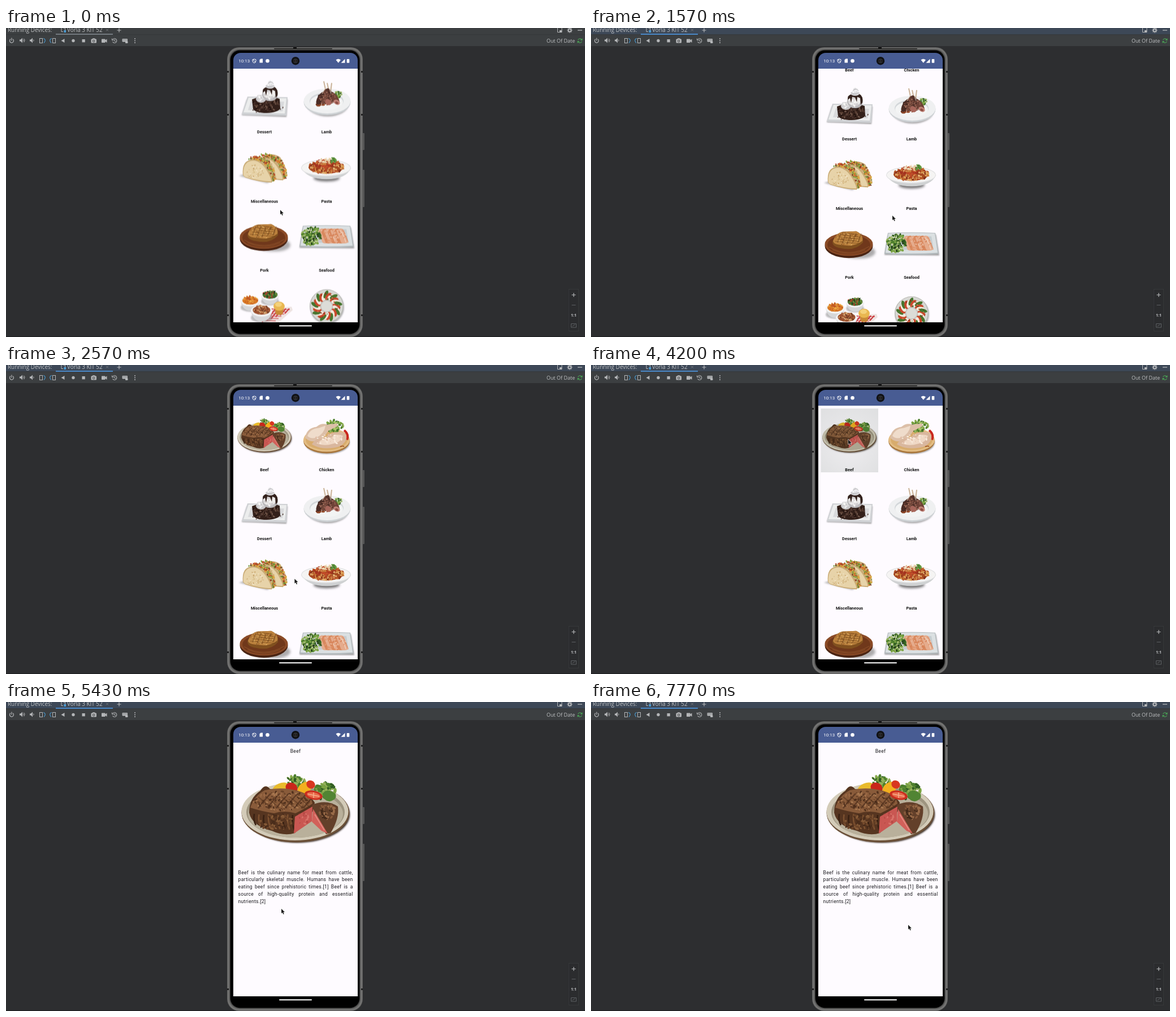
An HTML page with a canvas for the animation above (8 s loop, 1024 by 547 pixels).

```html
<!DOCTYPE html>
<html lang="en">
<head>
<meta charset="utf-8">
<title>Recipe app demo</title>
<style>
html, body { margin: 0; width: 100%; height: 100%; overflow: hidden; background: #2d2e30; }
canvas { display: block; width: 100%; height: 100%; }
</style>
</head>
<body>
<canvas id="stage" width="1024" height="547"></canvas>
<script>
const LOOP = 8000, PITCH = 122.4, PAPER = '#fefbff', ICON = '#b4b6b8';
const stage = document.getElementById('stage').getContext('2d');
let g = stage, seed = 1;

const rnd = () => (seed = seed * 16807 % 2147483647) / 2147483647;
const fill = (c, d) => { g.fillStyle = c; g.fill(new Path2D(d)); };
const line = (c, w, d) => { g.strokeStyle = c; g.lineWidth = w; g.stroke(new Path2D(d)); };
const oval = (c, x, y, rx, ry = rx, rot = 0) => {
  g.fillStyle = c;
  g.beginPath();
  g.ellipse(x, y, rx, ry, rot, 0, 7);
  g.fill();
};
const ring = (c, w, x, y, r, from = 0, to = 7) => {
  g.strokeStyle = c;
  g.lineWidth = w;
  g.beginPath();
  g.arc(x, y, r, from, to);
  g.stroke();
};
const box = (c, x, y, w, h, r = 0) => {
  g.fillStyle = c;
  g.beginPath();
  g.roundRect(x, y, w, h, r);
  g.fill();
};
const text = (s, x, y, font, c, align = 'left') => {
  g.font = font;
  g.fillStyle = c;
  g.textAlign = align;
  g.fillText(s, x, y);
};
// Scatter small ovals inside an ellipse.
const bits = (colors, n, x, y, rx, ry, size) => {
  for (let i = 0; i < n; i++) {
    const a = rnd() * 6.283, r = Math.sqrt(rnd()), s = size * (0.6 + 0.6 * rnd());
    oval(colors[i % colors.length], x + rx * r * Math.cos(a), y + ry * r * Math.sin(a), s, s * 0.55, rnd() * 3);
  }
};
const soft = (c, blur, draw) => {
  g.save();
  g.filter = `blur(${blur}px)`;
  draw(c);
  g.restore();
};

const GREENS = ['#4d7f2d', '#7ba343', '#2f5a22', '#93b05a'];

// Drawn at full size; the grid shows it at half scale.
function beef() {
  soft('#2a1d15', 1.5, c => oval(c, 3, 9, 93, 50));
  oval('#6b5038', 0, 6, 95.5, 52.5);
  oval('#d3cbb8', -1, 4, 94.5, 51);
  oval('#9d947f', 0, 5, 87, 45);
  oval('#b9b09b', 0, 8, 84, 42);
  bits(GREENS, 45, 0, -49, 17, 9, 4);
  bits(GREENS, 70, 53, -33, 18, 14, 4.5);
  oval('#e9bb2c', -27, -39, 14, 7, -.4);
  oval('#c9261b', -7, -38, 11, 9, .5);
  oval('#f3b01f', 16, -37, 14, 10, -.7);
  oval('#d83720', 27, -44, 8, 7, .6);
  fill('#518433', 'M48-28Q58-39 71-27Q74-17 60-14Q48-16 48-28Z');
  fill('#563520', 'M-82 6Q-82-20-62-33Q-54-47-45-36L0-34Q24-28 34-12L32 2L-1 42Q-20 48-42 38Q-77 29-82 6Z');
  fill('#895b3a', 'M-80-3Q-72-25-54-34Q-22-41 6-32Q28-26 30-10Q18-2 0 7Q-20 1-38 7Q-62 3-80-3Z');
  bits(['#a87850', '#6b4429', '#976643', '#4f301d'], 150, -25, -15, 50, 17, 2.6);
  for (let i = 0; i < 6; i++) {
    line('#42271899', 2.5, `M${-66 + i * 16}-2q7-10 22-26`);
    line('#4a2c1a77', 2, `M${-66 + i * 14}-22q12 9 23 20`);
  }
  for (let i = 0; i < 9; i++) line(i % 2 ? '#7d5130' : '#382012', 2.5, `M${-73 + i * 8.5} ${8 + i % 3}q-2 12 3 ${20 + i}`);
  bits(['#6d4529', '#4a2d1b', '#855a37'], 60, -36, 22, 33, 13, 3);
  fill('#c95752', 'M-1 13L30-5L29 21L-3 43Z');
  bits(['#d9736a', '#b84a46'], 18, 14, 18, 11, 12, 2.5);
  fill('#63402a', 'M29-8Q55-19 75-5Q78 16 62 42L54 44L32 2Z');
  bits(['#85583a', '#432a1a', '#9a6c49'], 45, 57, 4, 15, 13, 3);
  fill('#d2605a', 'M31-1L57 43L46 38L29 22Z');
  line('#e59286', 1.5, 'M34 9L51 37');
  oval('#c92d1e', 32, -25, 16, 8, .2);
  oval('#e8694b', 32, -25, 12, 5, .2);
  line('#f6b08d', 1.5, 'M22-27L42-23M32-30V-20');
}

function chicken() {
  soft('#6669', 1.2, c => oval(c, 1, 11, 40, 20));
  oval('#a9773d', 0, 8, 41, 22);
  oval('#e3bd84', 0, 6, 41, 21);
  oval('#d8ac6d', 0, 6, 37, 18);
  bits(GREENS, 60, 14, -18, 16, 10, 3.2);
  bits(['#a9c968'], 14, 14, -19, 13, 8, 2);
  line('#c9281f', 4, 'M31-11Q40-4 36 6');
  fill('#dcbfa8', 'M-38 2Q-35-15-18-17Q-9-25 1-21L18-23Q22-20 17-17L3-10Q-4 2-15 7Q-30 12-38 2Z');
  fill('#efdccb', 'M-34-1Q-29-14-14-15L-2-19Q-4-5-18 2Q-28 5-34-1Z');
  fill('#d9b79e', 'M-26 14Q-20 2-3 2Q10-9 22-8Q36-8 35 4Q30 18 13 20Q-7 23-20 17Z');
  fill('#efd8c5', 'M-18 12Q-5 2 8 2Q19-6 29-1Q25 11 11 13Q-5 18-18 12Z');
  bits(['#fbeee0', '#e0bba3', '#f5e3d3'], 34, 4, 5, 24, 9, 2);
  line('#9b4f23', 1.5, 'M24 18q5-2 7 0');
}

function dessert() {
  soft('#777a', 1, c => fill(c, 'M-31 1L41 1L39 32L-40 29Z'));
  fill('#cfd1d4', 'M-30-4L41-3L39 30L-40 28Z');
  fill('#eceded', 'M-28-2L39-1L36 26L-37 24Z');
  fill('#d9dadc', 'M-24 4L35 5L32 22L-29 20Z');
  bits(['#3b211a'], 28, 2, 17, 33, 8, 1.3);
  fill('#33201a', 'M-22 1Q2-9 27 0L28 17Q24 24 4 25Q-16 25-20 18Z');
  bits(['#5b4034', '#21120e', '#47302a', '#70564a'], 110, 3, 10, 24, 12, 2);
  oval('#c9c8ca', -6, 0, 9, 7);
  bits(['#f5f4f3', '#dedddf'], 22, -7, -2, 7, 5, 2.5);
  oval('#bcbabc', 10, -8, 14, 12);
  oval('#e9e7e6', 9, -9, 11, 9);
  bits(['#f7f5f3', '#cfccce'], 24, 9, -8, 10, 8, 2.5);
  fill('#33211c', 'M-3-11Q-4-19 4-21L18-21Q25-17 23-6L20-2L19-14L14-16L13-7L10-15L5-16L3-5L1-14Z');
  oval('#cfced1', 10, -22, 8, 4);
  bits(['#f2f2f3', '#dcdbde'], 22, 11, -26, 5, 5, 2.5);
  line('#a9a8ac', .8, 'M5-22q8 2 12-2M6-27q7-6 10 1');
}

function lamb() {
  soft('#777a', 1.5, c => oval(c, 2, 11, 36, 20));
  oval('#cdd1d4', 1, 6, 41.5, 23);
  oval('#eff0f1', 1, 4, 41.5, 22);
  oval('#d3d7da', 0, 4, 30, 15);
  oval('#f3f4f4', 0, 6, 29, 14);
  bits(['#8a4223', '#a8572f', '#6d3019'], 30, -9, 9, 13, 4, 2.2);
  bits(GREENS, 34, 21, -8, 6, 6, 2.2);
  line('#c9b196', 2, 'M-1-12L-5-31M4-14L1-28M7-12L9-28');
  oval('#4a2c25', -10, -1, 6, 13, .55);
  oval('#6d4438', -3, -4, 6, 14, .25);
  oval('#55332b', 5, -5, 6, 14, -.25);
  oval('#6f4237', 14, -1, 6, 13, -.6);
  bits(['#8d5d4e', '#3c241f', '#79493c', '#a2705f'], 65, 1, -2, 16, 11, 1.8);
  oval('#a7665b', 3, 6, 6, 5, .6);
  oval('#c28378', 18, 6, 6, 4, .5);
  oval('#8b4c42', 18, 7, 3, 2, .5);
  line('#e2d5c4', 1, 'M-8-9l6-10M8-9l-3-9');
}

function taco(x, y) {
  const stuffing = ['#6f8f35', '#b5492a', '#d9a93f', '#8fa845', '#74442b', '#d9762f'];
  g.save();
  g.translate(x, y);
  fill('#cdb07d', 'M-27-13Q-8-26 8-15Q19 2 21 18L13 25Z');
  // Filling follows the open edge of the shell.
  for (let i = 0; i <= 12; i++) {
    const k = i / 12, q = 1 - k;
    bits(stuffing, 9, -23 * q * q + 22 * q * k + 16 * k * k, -16 * q * q - 44 * q * k + 21 * k * k, 5, 4, 2.2);
  }
  fill('#c9ab75', 'M-38 13Q-41-14-20-15Q-4-14 7 5Q16 20 13 26Q-11 25-34 17Z');
  fill('#e7d3a9', 'M-37 13Q-39-12-20-13Q-5-12 5 6Q13 20 12 24Q-11 23-34 16Z');
  bits(['#d6bd88', '#f1e4c6', '#cba973'], 50, -17, 6, 16, 12, 1.4);
  g.restore();
}

function tacos() {
  soft('#8889', 1.5, c => fill(c, 'M-45 14L-30 9L12 23L5 27Z'));
  taco(20, -4);
  taco(0, 0);
}

function pasta() {
  soft('#444b', 2, c => oval(c, 0, 18, 23, 6));
  fill('#cfd1d2', 'M-44 0Q-35 20 0 20Q35 20 43 0Z');
  oval('#dedfe0', -1, 0, 44, 15);
  oval('#f5f4f3', -1, 0, 43, 13.5);
  oval('#a5491f', -1, -1, 31, 11);
  bits(['#c87a38', '#a93f1f', '#dba05a', '#b9562a', '#85301a', '#e5b373'], 200, 0, -2, 31, 11, 2.8);
  bits(['#a63320', '#c34c28'], 40, -3, -7, 19, 8, 2.6);
  bits(['#f6e7cd', '#e4c99f'], 50, -1, -13, 14, 4, 1.7);
  bits(['#4a8031', '#6a9c44'], 14, 12, -14, 5, 4, 2.5);
}

function pork() {
  soft('#7779', 2, c => oval(c, 9, 11, 37, 14, .1));
  oval('#4a2413', -1, 3, 42.5, 21.5);
  oval('#8a4a26', -1, 0, 42.5, 20.5);
  oval('#70381b', -1, 1, 38, 17.5);
  line('#96592f', .8, 'M-36 5Q0 25 35 4M-30 10Q0 24 28 10');
  fill('#80501f', 'M-30-4Q-24-20-12-22L12-23Q26-17 24-3Q10 13-15 7Q-30 5-30-4Z');
  fill('#bb813d', 'M-29-6Q-23-20-12-22L12-23Q25-17 23-6Q8 6-14 1Q-28 1-29-6Z');
  bits(['#d3a057', '#a66b30', '#c48d48', '#93602c'], 90, -3, -9, 22, 11, 2);
  for (let i = 0; i < 5; i++) {
    line('#6b4019aa', 1.2, `M${-21 + i * 9}-3l6-16`);
    line('#744719aa', 1, `M${-25 + i * 3} ${-5 - i * 4}l${44 - i * 4} 4`);
  }
}

function seafood() {
  soft('#777a', 1, c => fill(c, 'M-42-16L43-17L49 20L-48 19Z'));
  fill('#b3babd', 'M-42-20Q0-22 42-20L48 17Q0 21-48 17Z');
  fill('#dbe0e2', 'M-41-19Q0-21 41-19L46 15Q0 18-46 15Z');
  fill('#c6cdd0', 'M-36-14L35-14L39 10L-39 10Z');
  for (let i = 0; i < 7; i++) {
    const x = -12 + i * 5.5;
    fill(i % 2 ? '#d9895f' : '#e5ab8c', `M${x}-14q6-3 10 2l8 21q-7 4-13 1l-8-19Z`);
    line('#f1d2bd', 1.3, `M${x + 3}-12q6 8 10 21`);
    line('#c9734a', .7, `M${x + 7}-13q6 8 9 20`);
  }
  bits(['#e39a72', '#edc2a8', '#d68258'], 50, 13, -1, 22, 12, 1.8);
  bits(GREENS, 130, -27, -2, 17, 16, 3.2);
  bits(['#b5c97f', '#d3dab2'], 34, -27, -2, 15, 14, 1.6);
  bits(['#253f1b'], 20, -28, 0, 14, 12, 2);
}

function bowl(x, y, r, colors) {
  soft('#7777', 1, c => oval(c, x, y + r * .65, r, r * .45));
  fill('#d6d7d9', `M${x - r} ${y}Q${x - r * .8} ${y + r} ${x} ${y + r}Q${x + r * .8} ${y + r} ${x + r} ${y}Z`);
  oval('#f3f3f3', x, y, r, r * .55);
  oval(colors[0], x, y - 1, r * .82, r * .42);
  bits(colors, 75, x, y - 2, r * .78, r * .4, 2);
}

function side() {
  fill('#eee4e2', 'M14 4L48 1L50 7L25 29L-5 28Z');
  for (let i = 0; i < 6; i++) {
    line('#c8353a', 2, `M${14 + i * 6} 4l-${18 - i * 2} ${24 - i * 3}`);
    line('#d2474b99', 2, `M${12 - i * 4} ${5 + i * 4}l${33 - i} 1`);
  }
  bowl(-25, -9, 17, ['#d97a27', '#eda945', '#bf5524']);
  bowl(10, -19, 16, ['#3a6a2b', '#6f9640', '#b03f2b', '#25421f']);
  bowl(-5, 8, 19, ['#9c5230', '#c58452', '#6b3a24', '#d9b483']);
  fill('#c88a37', 'M18 1L35 1L32 14Q26 17 20 14Z');
  oval('#e9b750', 26, 0, 10, 8);
  oval('#f4d27a', 25, -3, 6, 4);
}

function starter() {
  soft('#7778', 1, c => oval(c, 1, 2, 30));
  oval('#b9b9b5', 0, 0, 30);
  oval('#d9d9d5', 0, -.5, 28.5);
  oval('#c5c5c0', 0, 0, 25);
  for (let i = 0; i < 27; i++) {
    const a = i * 6.283 / 27, r = i % 3 == 2 ? 21 : 17.5;
    oval(['#c9482c', '#f1eade', '#47752f'][i % 3], r * Math.cos(a), r * Math.sin(a), 7.5, 4.2 - i % 3 * .5, a + .5);
  }
  bits(['#8f2d1c', '#2f5a22', '#e07350'], 26, 0, 0, 23, 23, 1.6);
  oval('#dcdcd7', 0, 0, 9.5);
}

const dishes = [
  ['Beef', beef], ['Chicken', chicken], ['Dessert', dessert], ['Lamb', lamb], ['Miscellaneous', tacos],
  ['Pasta', pasta], ['Pork', pork], ['Seafood', seafood], ['Side', side], ['Starter', starter]
];

function serve(draw, x, y, scale) {
  seed = 4711;
  g.save();
  g.translate(x, y);
  g.scale(scale, scale);
  draw();
  g.restore();
}

function layer(paint) {
  const c = document.createElement('canvas');
  c.width = 1024;
  c.height = 760;
  g = c.getContext('2d');
  paint();
  g = stage;
  return c;
}

const menu = layer(() => {
  box(PAPER, 402, 0, 220, 760);
  dishes.forEach(([name, draw], i) => {
    const x = 457 + i % 2 * 110, y = (i >> 1) * PITCH;
    serve(draw, x, (i ? 126.5 : 125.5) + y, i ? 1 : .5);
    text(name, x, 187.8 + y, 'bold 7.4px Roboto, sans-serif', '#111', 'center');
  });
});

const story = [
  'Beef is the culinary name for meat from cattle,',
  'particularly skeletal muscle. Humans have been',
  'eating beef since prehistoric times.[1] Beef is a',
  'source of high-quality protein and essential',
  'nutrients.[2]'
];
const detail = layer(() => {
  const font = '8.56px Roboto, sans-serif', ink = '#1b1b1f';
  box(PAPER, 402, 0, 220, 760);
  g.letterSpacing = '0.27px';
  text('Beef', 512, 89.5, font, ink, 'center');
  serve(beef, 512, 190, 1);
  story.forEach((row, i) => {
    const words = row.split(' ');
    g.font = font;
    const widths = words.map(w => g.measureText(w).width);
    const gap = (203 - widths.reduce((a, b) => a + b)) / (words.length - 1);
    let x = 410.6;
    words.forEach((w, j) => {
      text(w, x, 304.6 + i * 12.84, font, ink);
      x += widths[j] + gap;
    });
  });
});

function speaker(x, waves) {
  fill(ICON, `M${x - 4} 20.5h2l3-3v9l-3-3h-2Z`);
  for (let i = 1; i <= waves; i++) ring(ICON, 1, x + 1, 22, i * 2, -1, 1);
}

function ide(focused) {
  const ui = '9.9px "Open Sans", sans-serif', ink = '#bfc1c3';
  box('#2d2e30', 0, 0, 1024, 547);
  box('#3c3f41', 0, 0, 1024, 32);
  if (focused) box('#3d4857', 0, 0, 1024, 11.5);
  box('#323436', 0, 11.5, 1024, .7);
  box(focused ? '#4a88c7' : '#747a80', 88, 10, 101, 2);
  text('Running Devices:', 3, 7, ui, ink);
  text('Vorla 3 KIT 52', 108, 7, ui, ink);
  line(ICON, 1, 'M98 0V6.5H101M101 0H104.5V4');
  box('#4a9fd8', 102.5, 4, 3.5, 4);
  line('#7d8083', .8, 'M177 1.5l4 4m0-4l-4 4');
  line(ICON, 1.2, 'M196.5 4h7M200 .5v7');
  line(ICON, 1, 'M975.5 0V7.5H983V0');
  box(ICON, 979, 4, 4, 3.5);
  ring(ICON, 2, 997, 4, 2.5);
  for (let i = 0; i < 8; i++) oval(ICON, 997 + 4 * Math.cos(i * .785), 4 + 4 * Math.sin(i * .785), .8);
  line(ICON, 1.3, 'M1011 4h8');

  ring(ICON, 1.2, 10, 22.5, 3.5, -.9, 4.1);
  line(ICON, 1.2, 'M10 17.5v5');
  speaker(28, 2);
  speaker(46, 1);
  for (const [x, d] of [[62, 1], [85, -1]]) {
    g.strokeStyle = ICON;
    g.lineWidth = 1;
    g.strokeRect(x - 2.5, 18.5, 5, 8);
    line('#4a9fd8', 1.1, `M${x + d * 4} 18.5q${d * 4} 1 ${d * 3} 5l${-d * 2} 3`);
  }
  fill(ICON, 'M97.5 22.5l6-3.5v7Z');
  oval(ICON, 119, 22.5, 2.7);
  box(ICON, 134.5, 20, 5.3, 5.3);
  box(ICON, 150.5, 19.5, 9.5, 7, 1);
  box(ICON, 153, 18.3, 4.5, 2);
  ring('#3c3f41', 1, 155.2, 23, 1.8);
  box(ICON, 169, 19.5, 6.5, 6.5, .7);
  fill(ICON, 'M175 22l3.5-2.5v6.5l-3.5-2.5Z');
  ring(ICON, 1.1, 192, 22.5, 3.8, -2.6, 2.7);
  line(ICON, 1, 'M187.5 18.5v3h3M192 20v3l2 1');
  box(ICON, 205.5, 19, 9.5, 5.5, 1);
  for (let i = 0; i < 4; i++) box('#3c3f41', 206.8 + i * 2, 20.5, 1, 1);
  box(ICON, 211, 23.5, 4.5, 3.5, 1);
  for (const y of [19, 22.5, 26]) oval(ICON, 228, y, 1);
  text('Out Of Date', 956, 25.5, '9px "Open Sans", sans-serif', ink);
  ring('#499c54', 1.2, 1015, 22.5, 3.6, -2.8, -.3);
  ring('#499c54', 1.2, 1015, 22.5, 3.6, .3, 2.8);
  fill('#499c54', 'M1019.5 18v4h-4ZM1010.5 27v-4h4Z');

  box('#3a3c3e', 995, 462, 18, 75, 1);
  box('#2b2c2e', 995.7, 462.7, 16.6, 73.6, 1);
  line(ICON, 1.2, 'M1000.5 472.5h7M1004 469v7');
  line('#5d6063', 1, 'M1000.5 490.5h7');
  text('1:1', 1004, 511, 'bold 7px "Open Sans", sans-serif', ink, 'center');
  line('#5d6063', 1, 'M999.5 523.5h9v6.5h-9ZM1001.5 528l5-3');
  box('#202123', 0, 545.8, 1024, 1.2);
}

function phone() {
  box('#565656', 630, 186, 4, 30, 1);
  box('#565656', 630, 251, 4, 66, 1);
  box('#5c5c5b', 391, 34, 240, 513, 21);
  box('#757574', 392, 35, 238, 511, 20);
  box('#60605f', 394, 37, 234, 507, 19);
  box('#2c2c2c', 396, 38.7, 230, 503.5, 17.5);
  box('#000', 397, 39.7, 228, 501.5, 17);
  box('#1a1a1a', 474, 36, 103, 1.6, 1);
  box('#111', 508, 34, 6, 2);
  for (const y of [76, 152, 507]) {
    box('#222', 391, y, 3, 3);
    box('#222', 628, y, 3, 3);
  }
  box('#485c93', 402, 44, 220, 28, [13, 13, 0, 0]);
  box('#fff', 483, 526.2, 58, 2, 1);
  text('10:13', 411.3, 61.3, '8px Roboto, sans-serif', '#fff');
  line('#fff', 1, 'M439 55l3 1v2q0 3-3 4q-3-1-3-4v-2ZM437 56l4.5 5');
  fill('#fff', 'M448.5 56.5l2-2h3.5v7h-5.5Z');
  oval('#fff', 462.5, 58.2, 3.3);
  fill('#fff', 'M583.5 56.5q4-3.5 8.5 0l-4.2 5.2ZM592.5 61.7l7-7v7Z');
  box('#fff', 602.7, 55, 4.6, 6.8, .8);
  oval('#101114', 512, 58.2, 7.2);
  oval('#2b2d30', 512, 58.2, 4);
  oval('#1c1512', 510, 58.2, 1.2);
  oval('#1c1512', 514, 58.2, 1.2);
}

// Pointer keys: time, x, y, and 1 to glide on to the next key.
const path = [
  [0, 485, 322, 0], [300, 485, 322, 1], [910, 532, 318, 0], [1570, 533, 332, 0], [1680, 536, 372, 0],
  [1800, 538, 402, 0], [1970, 540, 435, 0], [2070, 539, 432, 0], [2180, 533, 422, 0], [2300, 523, 408, 0],
  [2570, 510.5, 379, 1], [2990, 458, 140, 1], [3085, 470, 118, 1], [3170, 477, 122, 0], [3930, 458, 139, 0],
  [4200, 455, 132, 0], [5430, 487, 366, 0], [5630, 447, 386, 0], [5830, 475, 346, 0], [6130, 471, 344, 0],
  [6270, 421, 368, 0], [6430, 412, 387, 0], [6570, 415, 396, 0], [6870, 431, 396, 0], [7030, 548, 395, 0],
  [7270, 567, 395, 0], [7530, 563, 395, 0], [7770, 561, 394.5, 0]
];
// Time, scroll offset, overscroll stretch.
const drag = [
  [0, 123.6, 1], [1570, 111, 1], [1680, 70, 1], [1800, 36, 1], [1970, 0, 1.02],
  [2070, 0, 1.012], [2180, 0, 1.005], [2300, 0, 1]
];
const fade = [[0, 0], [4430, .3], [4830, .95], [5170, 1]];
const at = (keys, t) => keys.findLast(k => k[0] <= t);

function pointer(t) {
  const [t0, x, y, glide] = at(path, t);
  const next = path.find(k => k[0] > t);
  const k = glide ? (t - t0) / (next[0] - t0) : 0;
  g.save();
  g.translate(x + (k && (next[1] - x) * k), y + (k && (next[2] - y) * k));
  const arrow = 'M0 0V8.2L1.9 6.5L3.3 9.8L4.8 9.2L3.4 6.1L6 5.9Z';
  line('#fffc', 1.2, arrow);
  fill('#1d1d1d', arrow);
  g.restore();
}

function ripple() {
  const shade = g.createRadialGradient(457, 145, 10, 457, 138, 75);
  shade.addColorStop(0, '#18302014');
  shade.addColorStop(1, '#18302022');
  box(shade, 406.5, 77, 101.5, 113);
}

function screen(t) {
  const [, scroll, stretch] = at(drag, t);
  const shown = at(fade, t)[1];
  g.save();
  g.beginPath();
  g.rect(402, 72, 220, 449);
  g.clip();
  if (shown < 1) {
    g.save();
    g.translate(0, 72);
    g.scale(1, stretch);
    g.drawImage(menu, 0, -72 - scroll);
    g.restore();
    if (t >= 4200) ripple();
  }
  g.globalAlpha = shown;
  g.drawImage(detail, 0, 0);
  g.restore();
}

function frame(now) {
  const t = now % LOOP;
  ide(t >= 900);
  phone();
  screen(t);
  pointer(t);
  requestAnimationFrame(frame);
}
requestAnimationFrame(frame);
</script>
</body>
</html>
```
